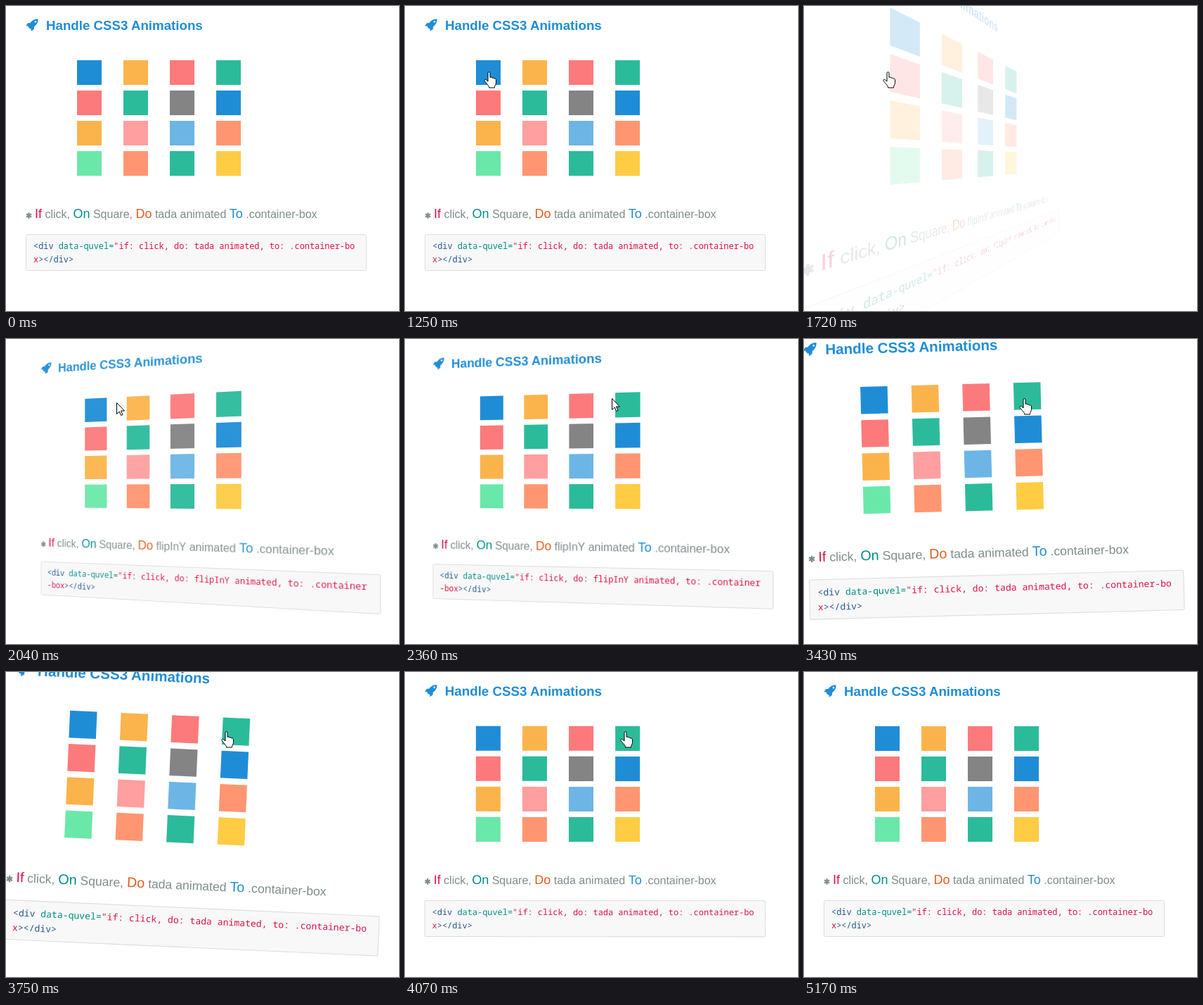
An HTML page that plays this animation: 559x433 px, repeating every 5.24 s.

```html
<!DOCTYPE html>
<html lang="en">
<head>
<meta charset="utf-8">
<title>Handle CSS3 Animations</title>
<style>
  html, body { margin: 0; width: 100%; height: 100%; overflow: hidden; background: #fff; }
  #stage { position: relative; width: 100%; height: 100%; overflow: hidden; contain: strict; }
  #page, #overlay { position: absolute; left: 0; top: 0; width: 559px; height: 433px; }
  #page { transform-origin: 270.5px 217px; }
  svg { display: block; }
  text { white-space: pre; }
  .title { font: bold 18.72px "Liberation Sans", Arial, sans-serif; fill: #1f8dd6; }
  .rule { font: 16px "Liberation Sans", Arial, sans-serif; fill: #7f8c8d; }
  .key { font-size: 18px; }
  .code { font: 11.92px "Noto Sans Mono", "DejaVu Sans Mono", monospace; }
  .red { fill: #dd1144; }
  .teal { fill: #008c85; }
  .orange { fill: #e25d1d; }
  .blue { fill: #1f8dd6; }
  .tag { fill: #25588a; }
  #overlay path { fill: #fff; stroke: #000; stroke-linejoin: round; }
</style>
</head>
<body>
<div id="stage">
  <div id="page">
    <svg width="559" height="433">
      <g transform="translate(28 18)">
        <path class="blue" d="M17.7.6C13 .4 9.5 2 6.5 6L3 6.3.3 10.5 4 10.6 3.6 11.8 6.3 14.4 7.5 14 7.6 17.7 11.8 15 12 11.5C16 8.5 17.9 5 17.7.6Z"/>
        <circle cx="14" cy="4.3" r="1.3" fill="#fff"/>
      </g>
      <text class="title" x="57" y="34">Handle CSS3 Animations</text>
      <g id="squares"></g>
      <path d="M32.5 293.3v8.4M28.9 295.4l7.2 4.2M28.9 299.6l7.2-4.2" stroke="#7f8c8d" stroke-width="2.2"/>
      <text class="rule" x="41" y="301"><tspan class="key red">If</tspan> click, <tspan class="key teal">On</tspan> Square, <tspan class="key orange">Do</tspan> <tspan class="effect">tada</tspan> animated <tspan class="key blue">To</tspan> .container-box</text>
      <rect x="28.5" y="324.5" width="484" height="51" rx="2" fill="#f8f8f8" stroke="#ddd"/>
      <text class="code" x="39" y="345"><tspan class="tag">&lt;div </tspan><tspan class="teal">data-quvel=</tspan><tspan class="red">"if: click, do: <tspan class="effect">tada</tspan> animated, to: .container<tspan id="lineEnd"></tspan></tspan></text>
      <text class="code" x="39" y="364"><tspan class="red" id="lineStart"></tspan><tspan class="tag">&gt;&lt;/div&gt;</tspan></text>
    </svg>
  </div>
  <svg id="overlay" width="559" height="433"><path id="cursor"/></svg>
</div>
<script>
const $ = id => document.getElementById(id);
const LOOP = 5240;

const palette = {
  b: '#1f8dd6', o: '#fbb44c', r: '#fc7a7b', t: '#2bbb9b', g: '#848484',
  p: '#ff9fa0', s: '#6db5e5', c: '#ff9671', m: '#6ae8a9', y: '#ffcc44'
};
$('squares').innerHTML = [...'bortrtgbopscmcty'].map((key, i) =>
  `<rect x="${101 + i % 4 * 66}" y="${77 + (i >> 2) * 43}" width="35" height="35" fill="${palette[key]}"/>`
).join('');

const cursors = {
  arrow: 'M.5.5V16.5L4.2 13 6.7 18.5 9 17.5 6.5 12H11.5Z',
  hand: 'M6 14V2.2a1.5 1.5 0 0 1 3 0V8.5c1-1 2.7-.6 3 .8c1-.8 2.5-.3 2.8.9c1.2-.6 2.7.1 2.7 1.6V15.5c0 3-1.5 4-2 6V23H7.5V21.5C6 19 3 16 1 13.2C.2 11.8 2.2 10.6 3.4 11.8Z',
  beam: 'M.5.5H2.5L3.5 1.5 4.5.5H6.5M3.5 1.5V14.5M.5 15.5H2.5L3.5 14.5 4.5 15.5H6.5'
};

function bezier(x1, y1, x2, y2) {
  const at = (a, b, u) => 3 * (1 - u) * u * ((1 - u) * a + u * b) + u ** 3;
  return x => {
    let lo = 0, hi = 1;
    for (let i = 0; i < 30; i++) {
      const mid = (lo + hi) / 2;
      if (at(x1, x2, mid) < x) lo = mid; else hi = mid;
    }
    return at(y1, y2, lo);
  };
}
const ease = bezier(.25, .1, .25, 1);
const easeIn = bezier(.42, 0, 1, 1);

// Keys are [progress, value]; easing applies inside each segment.
function interpolate(keys, p, easing = () => ease) {
  const i = Math.max(1, keys.findIndex(k => k[0] >= p));
  const [p0, v0] = keys[i - 1], [p1, v1] = keys[i];
  return v0 + (v1 - v0) * easing(i)((p - p0) / (p1 - p0));
}

const flipAngle = [[0, 90], [.4, -20], [.6, 10], [.8, -5], [1, 0]];
const tadaAngle = [[0, 0], [.1, -3], [.2, -3], [.3, 3], [.4, -3], [.5, 3], [.6, -3], [.7, 3], [.8, -3], [.9, 3], [1, 0]];
const tadaScale = [[0, 1], [.1, .9], [.2, .9], [.3, 1.1], [.9, 1.1], [1, 1]];

const effects = {
  flipInY: p => ({
    transform: `perspective(400px) rotateY(${interpolate(flipAngle, p, i => i < 3 ? easeIn : ease)}deg)`,
    opacity: easeIn(Math.min(1, p / .53))
  }),
  tada: p => ({
    transform: `scale(${interpolate(tadaScale, p)}) rotate(${interpolate(tadaAngle, p)}deg)`,
    opacity: 1
  })
};

// Each held step: start time, effect, effect progress, cursor, x, y.
const steps = [
  [0, 'tada', 1],
  [780, 'tada', 1, 'arrow', 191, 263],
  [930, 'tada', 1, 'arrow', 136, 164],
  [1100, 'tada', 1, 'hand', 112, 102],
  [1250, 'tada', 1, 'hand', 112, 93],
  [1720, 'flipInY', .2, 'hand', 112, 93],
  [1890, 'flipInY', .385, 'arrow', 118, 93],
  [2040, 'flipInY', .514, 'arrow', 157, 90],
  [2190, 'flipInY', .665, 'arrow', 226, 87],
  [2360, 'flipInY', .823, 'arrow', 294, 84],
  [2510, 'flipInY', .93, 'hand', 306, 84],
  [2670, 'flipInY', 1, 'hand', 306, 84],
  [3130, 'tada', .032, 'hand', 306, 84],
  [3280, 'tada', .18, 'hand', 306, 84],
  [3430, 'tada', .345, 'hand', 306, 84],
  [3600, 'tada', .515, 'hand', 306, 84],
  [3750, 'tada', .667, 'hand', 306, 84],
  [3920, 'tada', .83, 'hand', 306, 84],
  [4070, 'tada', .985, 'hand', 306, 84],
  [4230, 'tada', 1, 'hand', 304, 108],
  [4380, 'tada', 1, 'arrow', 323, 159],
  [4530, 'tada', 1, 'beam', 437, 334],
  [4700, 'tada', 1, 'arrow', 493, 423],
  [4850, 'tada', 1]
];

let shown;
function show(step) {
  if (step === shown) return;
  shown = step;
  const [, effect, progress, cursor, x, y] = step;
  const pose = progress < 1 ? effects[effect](progress) : { transform: 'none', opacity: 1 };
  Object.assign($('page').style, pose);

  const wide = effect === 'flipInY';
  document.querySelectorAll('.effect').forEach(el => el.textContent = effect);
  $('lineEnd').textContent = wide ? '' : '-bo';
  $('lineStart').textContent = wide ? '-box' : 'x';

  $('cursor').setAttribute('d', cursor ? cursors[cursor] : '');
  $('cursor').setAttribute('transform', `translate(${x || 0} ${y || 0})`);
}

const start = performance.now();
function tick() {
  const t = (performance.now() - start) % LOOP;
  show(steps.findLast(step => step[0] <= t));
  requestAnimationFrame(tick);
}
tick();
</script>
</body>
</html>
```
